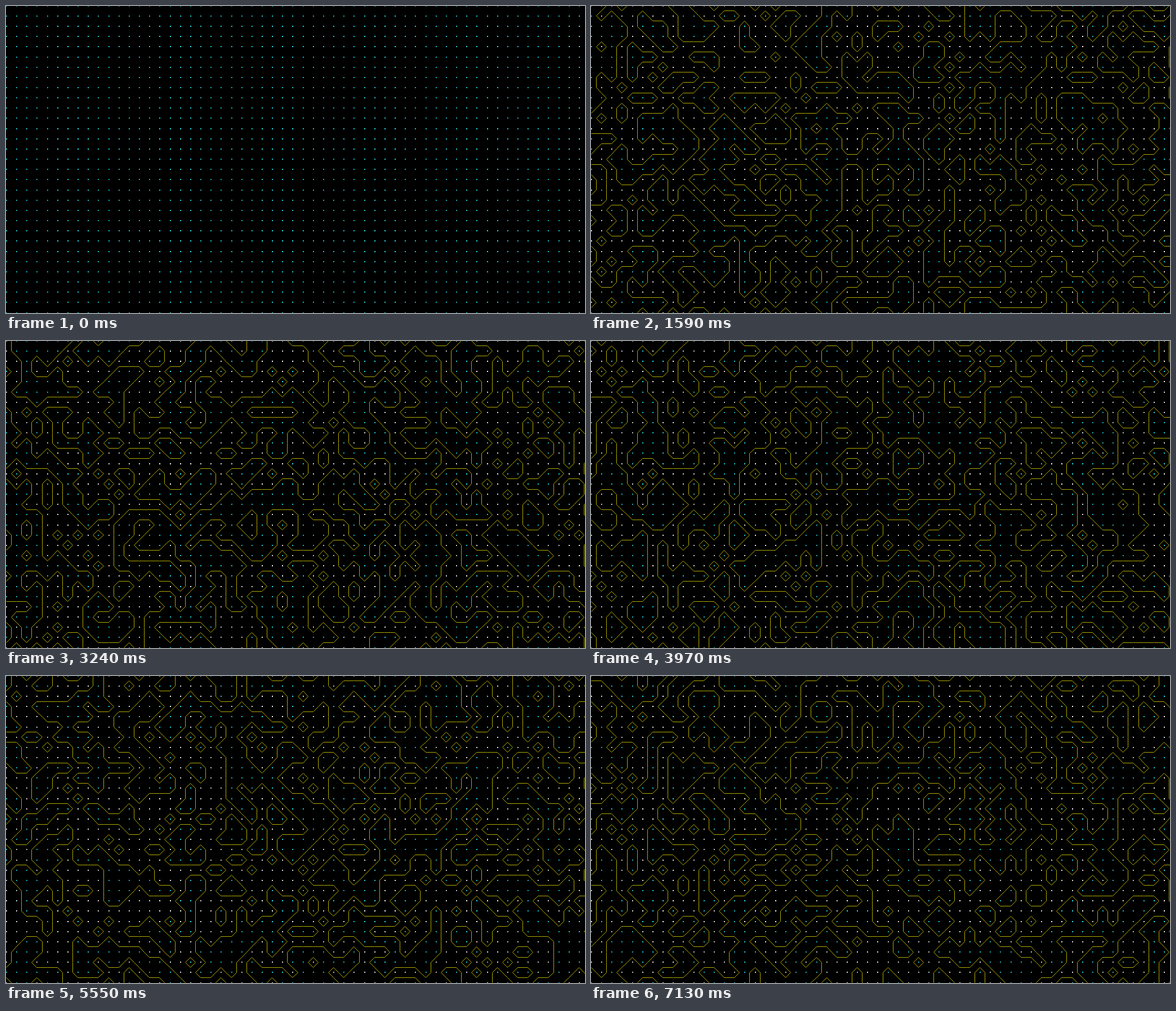
Recreate the animation shown at these times as an HTML page. Size 1028 by 545 pixels, loop 7990 ms.

```html
<!DOCTYPE html>
<html lang="en">
<head>
<meta charset="utf-8">
<title>Marching squares</title>
<style>
  html, body { margin: 0; width: 100%; height: 100%; overflow: hidden; background: #000; }
  svg { display: block; width: 100%; height: 100%; }
</style>
</head>
<body>
<svg viewBox="0 0 1028 545">
  <rect width="1028" height="545"/>
  <path id="zeros" fill="#1eecf5"/>
  <path id="ones" fill="#fff"/>
  <path id="contour" fill="none" stroke="#b0aa00" stroke-width="1"/>
</svg>
<script>
const LOOP = 7990;
const STARTS = [0, 860, 1590, 2450, 3240, 3970, 4760, 5550, 6340, 7130];
const STEP = 18.16, TOP = -0.8, COLS = 59, ROWS = 33;
const [zeros, ones, contour] = ['zeros', 'ones', 'contour'].map(id => document.getElementById(id));

function seededRandom(seed) {
  return () => {
    seed = (seed + 0x6D2B79F5) | 0;
    let t = Math.imul(seed ^ (seed >>> 15), 1 | seed);
    t = (t + Math.imul(t ^ (t >>> 7), 61 | t)) ^ t;
    return ((t ^ (t >>> 14)) >>> 0) / 4294967296;
  };
}

// The first field is empty; every later one is a fresh set of coin flips.
function makeField(index) {
  const random = seededRandom(index * 7919);
  return Array.from({ length: ROWS }, () =>
    Array.from({ length: COLS }, () => index > 0 && random() < 0.5 ? 1 : 0));
}

const gridX = i => i * STEP;
const gridY = j => TOP + j * STEP;
const snap = v => Math.round(v) + 0.5;

// Dots swell slightly in every tenth part of the grid.
function dot(i, j) {
  const w = i % 10 > 4 && i % 10 < 9 ? 2 : 1.7;
  const h = j % 10 > 1 && j % 10 < 5 ? 2 : 1.7;
  return `M${Math.round(gridX(i))} ${Math.round(gridY(j) - 0.5)}h${w}v${h}h${-w}z`;
}

// Contour of one cell; at saddles the ones stay connected.
function cellLines(field, i, j) {
  const tl = field[j][i], tr = field[j][i + 1];
  const bl = field[j + 1][i], br = field[j + 1][i + 1];
  const midX = snap(gridX(i + 0.5)), midY = snap(gridY(j + 0.5));
  const top = tl !== tr && [midX, snap(gridY(j))];
  const right = tr !== br && [snap(gridX(i + 1)), midY];
  const bottom = bl !== br && [midX, snap(gridY(j + 1))];
  const left = tl !== bl && [snap(gridX(i)), midY];
  const points = (tl ? [top, right, bottom, left] : [left, top, right, bottom]).filter(Boolean);
  return points.map((p, k) => (k % 2 ? 'L' : 'M') + p.join(' ')).join('');
}

function draw(index) {
  const field = makeField(index);
  const dots = ['', ''];
  let lines = '';
  for (let j = 0; j < ROWS - 1; j++) {
    for (let i = 0; i < COLS - 1; i++) {
      dots[field[j][i]] += dot(i, j);
      lines += cellLines(field, i, j);
    }
  }
  zeros.setAttribute('d', dots[0]);
  ones.setAttribute('d', dots[1]);
  contour.setAttribute('d', lines);
}

const origin = performance.now();
let shown = -1;

function update() {
  const time = (performance.now() - origin) % LOOP;
  const index = STARTS.filter(start => start <= time).length - 1;
  if (index !== shown) draw(shown = index);
  requestAnimationFrame(update);
}
update();
</script>
</body>
</html>
```
